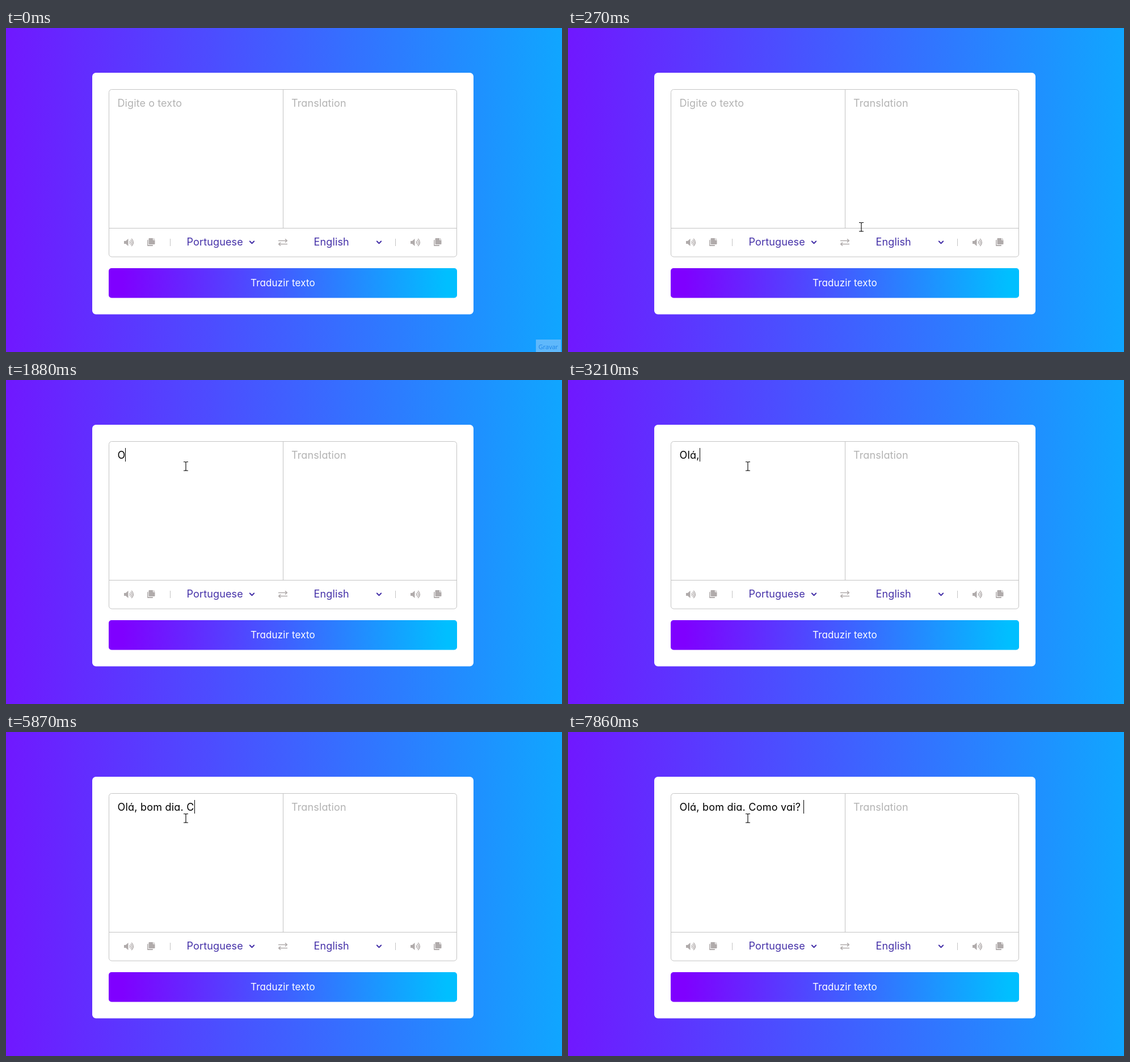
Recreate the animation shown at these times as an HTML page. Size 980 by 572 pixels, loop 8000 ms.

```html
<!DOCTYPE html>
<html lang="pt">
<head>
<meta charset="utf-8">
<title>Tradutor</title>
<style>
  html, body { margin: 0; width: 100%; height: 100%; overflow: hidden; }
  svg { display: block; }
  text {
    font: 18px Inter, "Open Sans", sans-serif;
    font-feature-settings: "cv11";
    letter-spacing: .14px;
    white-space: pre;
  }
  #input { letter-spacing: .22px; }
  #input.hint { letter-spacing: .1px; }
  .hint { fill: #b3b3b3; }
  .lang { fill: #4531a8; }
  .action { fill: #fff; font-size: 17px; text-anchor: middle; }
  .note { fill: #1b84e8; font: 11px "Open Sans", sans-serif; letter-spacing: 0; }
  .line { fill: none; stroke: #c4c4c4; }
  .cursor { fill: #fff; stroke: #000; stroke-linejoin: round; }
</style>
</head>
<body>
<svg width="980" height="572" viewBox="0 0 980 572">
  <defs>
    <linearGradient id="page">
      <stop stop-color="#7018ff"/>
      <stop offset="1" stop-color="#10a6ff"/>
    </linearGradient>
    <linearGradient id="idle">
      <stop offset=".04" stop-color="#7f00ff"/>
      <stop offset=".97" stop-color="#00bfff"/>
    </linearGradient>
    <linearGradient id="hover">
      <stop stop-color="#6a28ff"/>
      <stop offset=".97" stop-color="#00c4ff"/>
    </linearGradient>
    <g id="tools" fill="#b0abab">
      <path d="M0 5h3l4.5-4v13L3 10H0z"/>
      <path d="M10 5.2q2 2.3 0 4.6M11.7 3q4.2 4.5 0 9M13.3 .9q6 6.6 0 13.2" fill="none" stroke="#b0abab" stroke-width="1.4"/>
      <path d="M44.5 0H51v3.5h3.5V10q0 1-1 1h-9q-1 0-1-1V1q0-1 1-1zM52 0l2.5 2.5H52z"/>
      <path d="M42.5 3v9H51v1q0 1-1 1h-8q-1 0-1-1V4q0-1 1-1z"/>
    </g>
    <path id="chevron" d="M-3.7-2 0 1.7 3.7-2" fill="none" stroke="#4531a8" stroke-width="2" stroke-linecap="round" stroke-linejoin="round"/>
  </defs>

  <rect width="980" height="572" fill="url(#page)"/>
  <rect x="152" y="79" width="672" height="426.4" rx="6.500" fill="#fff"/>
  <rect class="line" x="181.5" y="108.5" width="613" height="295.5" rx="5"/>
  <path class="line" d="M182 353.5H794M488.5 109V353M289.5 372v13M686.5 372v13"/>

  <text id="input" x="196.5" y="138.5"></text>
  <rect id="caret" y="120" width="1" height="24"/>
  <text class="hint" x="503" y="138.5">Translation</text>

  <use href="#tools" x="208" y="371"/>
  <use href="#tools" x="713" y="371"/>
  <text class="lang" x="318.5" y="384">Portuguese</text>
  <use href="#chevron" x="433.5" y="378.5"/>
  <path d="M480 375.5h14M492 372.5l3.3 3-3.3 3M496 381.5H482M484 378.5l-3.3 3 3.3 3" fill="none" stroke="#b0abab" stroke-width="1.6"/>
  <text class="lang" x="542.5" y="384">English</text>
  <use href="#chevron" x="657.5" y="378.5"/>

  <rect id="button" x="181" y="424" width="614" height="52.4" rx="5"/>
  <text class="action" x="488" y="456">Traduzir texto</text>

  <g id="tip">
    <rect x="934" y="550" width="44" height="22" fill="#5fb8fb"/>
    <text class="note" x="938.5" y="567">Gravar</text>
  </g>

  <g id="pointer">
    <path class="cursor" id="arrow" d="M0 0V16l3.7-3.5 2.5 5.7 2.6-1.1-2.5-5.6H11.5z"/>
    <path class="cursor" id="hand" d="M-1.7 13V1.5q0-1.5 1.7-1.5t1.7 1.5V8q0-1.3 1.5-1.3T4.7 8.2q.2-.9 1.5-.8T7.5 9q.3-.7 1.3-.5T10 10v5q0 2.5-2 4.5V22H-1v-2.5L-5.500 13.5q-1-1.6.2-2.2t2.2.5z"/>
    <path id="beam" d="M-4-7.5h2.5q1.5 0 1.5 1V7q0 1-1.5 1H-4M4-7.5H1.5Q0-7.5 0-6.5M4 8H1.5Q0 8 0 7" fill="none" stroke="#000" stroke-width="1.1"/>
  </g>
</svg>
<script>
const LOOP = 8000, ENTER = 70, ARRIVE = 820, CLICK = 890, BLINK = 530;
const STEP = 62.5; // the pointer moves in visible steps

// bursts of typing: text, time of the first key, time between keys
const BURSTS = [["Olá", 1880, 330], [", bom", 3210, 165], [" dia", 4270, 110],
  [". Co", 5010, 290], ["mo vai", 6070, 132], ["? ", 7530, 330]];
const KEYS = BURSTS.flatMap(([text, first, gap]) =>
  [...text].map((char, i) => ({ char, time: first + i * gap })));

const el = id => document.getElementById(id);
const show = (id, on) => el(id).setAttribute("visibility", on ? "visible" : "hidden");
const inside = (x, y, l, t, r, b) => x >= l && x <= r && y >= t && y <= b;

function drawPointer(t) {
  const elapsed = Math.floor((t - ENTER) / STEP) * STEP;
  const left = (1 - Math.min(1, elapsed / (ARRIVE - ENTER))) ** 3;
  const x = Math.round(317 + 475 * left), y = Math.round(152 + 472 * left);
  const onButton = inside(x, y, 181, 424, 795, 476);
  const onText = inside(x, y, 182, 109, 794, 353);
  el("pointer").setAttribute("transform", `translate(${x} ${y})`);
  show("hand", onButton);
  show("beam", onText);
  show("arrow", !onButton && !onText);
  el("button").setAttribute("fill", `url(#${onButton ? "hover" : "idle"})`);
}

function drawInput(t) {
  const input = el("input");
  const pressed = KEYS.filter(key => key.time <= t);
  const typed = pressed.map(key => key.char).join("");
  const content = typed || "Digite o texto";
  if (input.textContent !== content) input.textContent = content;
  input.setAttribute("class", typed ? "" : "hint");

  const width = typed ? input.getComputedTextLength() : 0;
  const lastAction = typed ? pressed.at(-1).time : CLICK;
  el("caret").setAttribute("x", 197 + Math.floor(width));
  show("caret", t >= CLICK && Math.floor((t - lastAction) / BLINK) % 2 === 0);
}

const start = performance.now();
function frame(now) {
  const t = Math.max(0, now - start) % LOOP;
  show("tip", t < ENTER);
  drawPointer(t);
  drawInput(t);
  requestAnimationFrame(frame);
}
frame(start);
</script>
</body>
</html>
```
